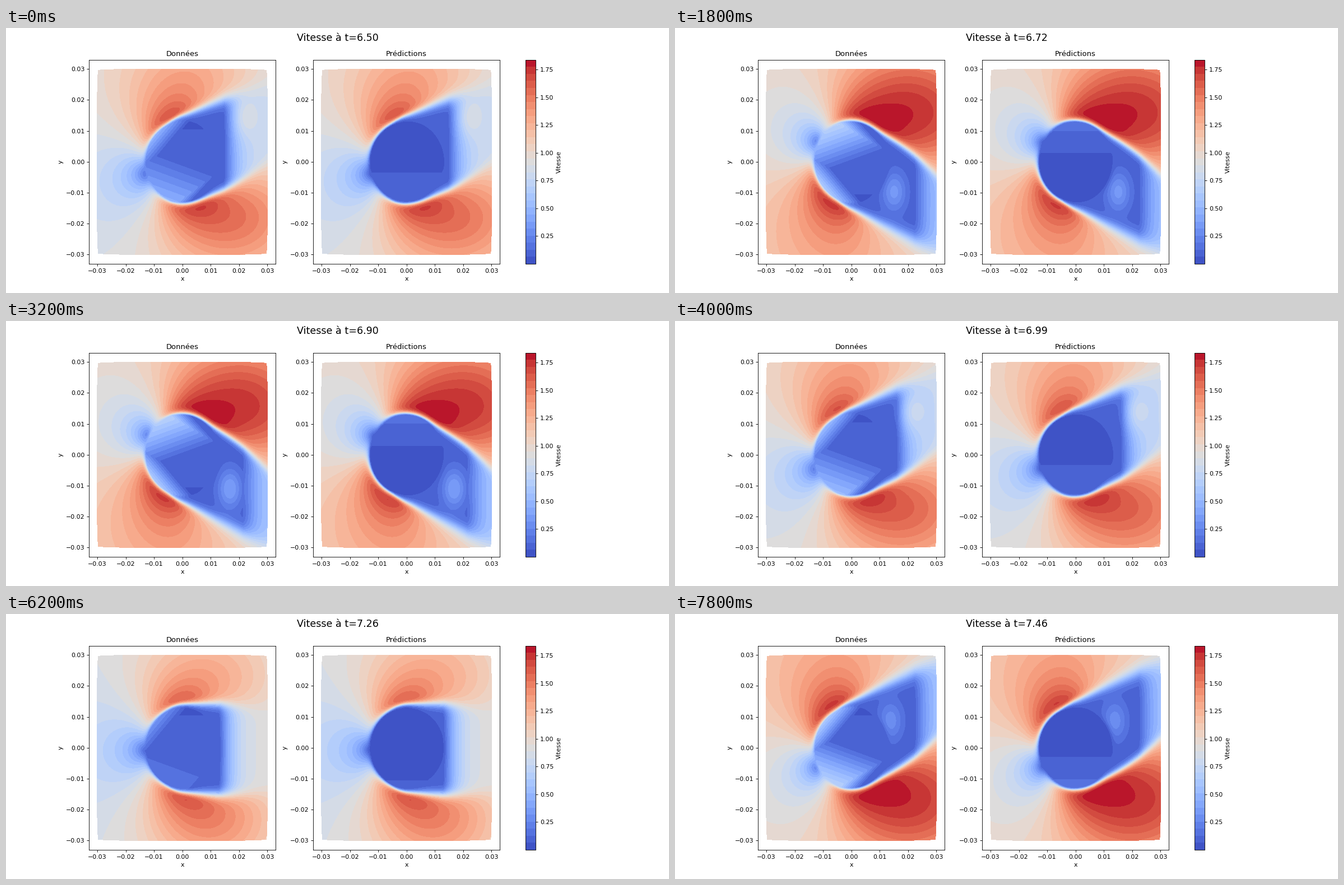
Write a matplotlib script that moves like this. It is 1183x473 px and loops after 8 s.

```python
import numpy as np
import matplotlib.pyplot as plt
from matplotlib.animation import FuncAnimation

W, H, DPI = 1183, 473, 78.86
FRAMES, INTERVAL = 40, 200
T0, DT = 6.504, 0.0245
FRAMES_PER_CYCLE = 6.714
RADIUS = 1.3
LEVELS = np.linspace(0, 1.838, 30)

# Grid in centimetres, slightly bulged along the four sides
s, t = np.meshgrid(np.linspace(-1, 1, 220), np.linspace(-1, 1, 220))
X = 3.015 * s * (1 - 0.014 * t**4)
Y = 3.005 * t * (1 - 0.013 * s**4)
R = np.hypot(X, Y)
Z = np.where(R < 0.5, 0.5, X + 1j * Y)
SKIN = np.tanh(np.clip(R - RADIUS, 0, None) / 0.12)


def wave(phase, peak, harmonic=1):
    """Oscillation over one shedding cycle, which spans two phase units."""
    return np.cos(np.pi * harmonic * (phase - peak))


def bell(dx, dy, sx, sy):
    return np.exp(-((dx / sx) ** 2 + (dy / sy) ** 2) / 2)


def side(phase, d):
    """Fast lobe, wake coverage and vortex on one side; d points outwards."""
    k = wave(phase, 0.75)
    strength = 0.42 + 0.27 * wave(phase, 0.65)
    lobe = strength * bell(X - 1.45 - k, d - 2.05 + 0.6 * k, 1.6, 1.3)

    x = np.clip(X, -1, 3)
    mean = 1.42 + 0.12 * x - 0.06 * x**2 - 0.4 * np.minimum(x, 0) ** 2
    reach = 0.13 + 0.32 * x + 0.07 * x**2
    edge = mean - reach * wave(phase, 0.76)
    thick = (0.07 + 0.07 * np.clip(x + 0.3, 0, None)) * (1 - 0.3 * k)
    cover = (1 - np.tanh((d - edge) / thick)) / 2

    age = (phase - 1.3) % 2
    power = 0.3 * np.sin(np.pi * min(age, 1)) ** 2
    vortex = power * bell(X - 0.75 - 2 * age, d - 0.4 - 1.5 * age, 0.3, 0.45)
    return lobe, cover, vortex


def flow(phase):
    """Potential flow around the tilted body, with lobes and a wake."""
    tilt = 0.5 * wave(phase, 0.7)
    speed = 0.97 + 0.1 * wave(phase, 0.68, 2)
    low_lobe, low_cover, low_vortex = side(phase, -Y)
    top_lobe, top_cover, top_vortex = side(phase + 1, Y)

    outer = speed * np.abs(1 - (RADIUS * np.exp(1j * tilt) / Z) ** 2)
    outer = outer + low_lobe + top_lobe
    outer = outer / (1 + (outer / 1.95) ** 8) ** 0.125

    start = 1.75 - 0.5 * wave(phase, 0.16, 2)
    height = 0.7 + 0.15 * wave(phase, 0.2, 2)
    wake = 0.08 + height * np.tanh(np.clip(X - start, 0, None) / 0.7)
    wake = wake + low_vortex + top_vortex

    cover = low_cover * top_cover * np.clip((X + 1) / 0.6, 0, 1)
    return outer + (wake - outer) * cover


def interiors(phase):
    """Measured facets and predicted near-rest speed inside the body."""
    k = wave(phase, 0.7)
    y, tilt = Y * np.sign(k), 0.5 * abs(k)
    slope = 0.09 + tilt * np.maximum(0, -0.3 * X - 0.9 * y)
    slope = slope - 0.06 * np.clip(y - 0.6, 0, 1)
    left = 0.1 + (0.5 + 0.8 * tilt) * (0.67 * y - 0.74 * X - 0.89 + 0.4 * tilt)
    right = 0.07 + 0.8 * np.maximum(0, 1.6 - X + y)
    measured = np.minimum(np.maximum(slope, left), right)
    predicted = 0.055 + 0.18 * tilt * np.maximum(0, -y - 0.2)
    return measured, predicted


def fields(n):
    phase = 1 + 2 * n / FRAMES_PER_CYCLE
    outside = flow(phase)
    return [np.clip(body + (outside - body) * SKIN, 0.005, 1.83)
            for body in interiors(phase)]


fig, axes = plt.subplots(1, 2, figsize=((W + 1e-6) / DPI, (H + 1e-6) / DPI), dpi=DPI)
ticks = np.arange(-3, 4) / 100
for ax, name in zip(axes, ("Données", "Prédictions")):
    ax.set(title=name, xlabel="x", ylabel="y", xticks=ticks, yticks=ticks,
           xlim=(-0.033, 0.033), ylim=(-0.033, 0.033))
title = fig.suptitle("", fontsize=16)


def paint(ax, speed):
    return ax.contourf(X / 100, Y / 100, speed, levels=LEVELS, cmap="coolwarm")


layers = [paint(ax, v) for ax, v in zip(axes, fields(0))]
bar = fig.colorbar(layers[0], ax=axes, label="Vitesse",
                   ticks=np.arange(1, 8) / 4, format="%.2f")
bar.minorticks_off()


def update(n):
    for layer in layers:
        layer.remove()
    layers[:] = [paint(ax, v) for ax, v in zip(axes, fields(n))]
    title.set_text(f"Vitesse à t={T0 + DT * n:.2f}")
    return [*layers, title]


anim = FuncAnimation(fig, update, frames=FRAMES, init_func=lambda: update(0),
                     interval=INTERVAL, repeat=True, repeat_delay=0)
plt.show()
```
